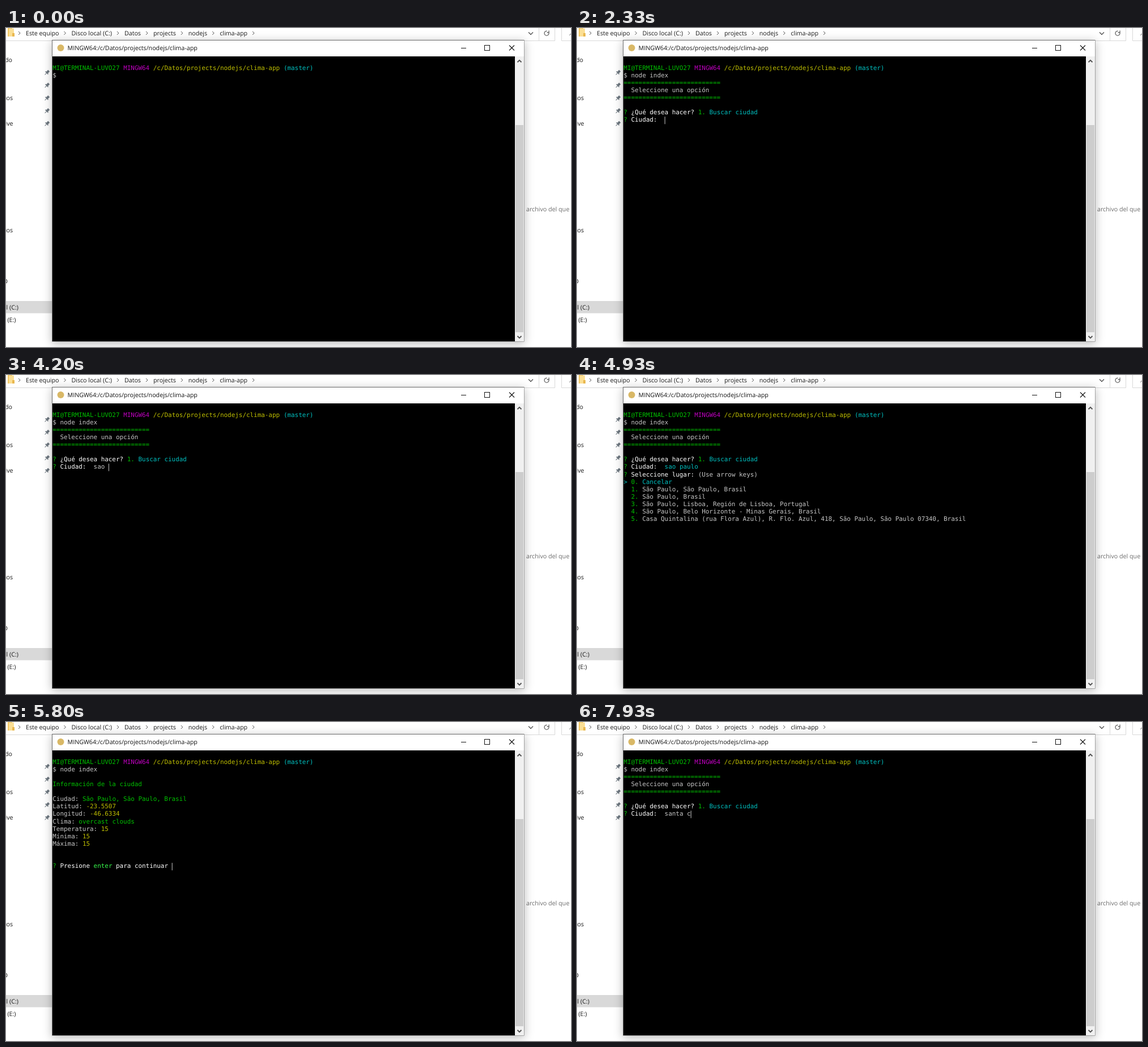
An HTML page with a canvas for the animation above (8000 ms loop, 997 by 562 pixels).

```html
<!DOCTYPE html>
<html lang="es">
<head>
<meta charset="utf-8">
<title>clima-app</title>
<style>
html, body { margin: 0; width: 100%; height: 100%; overflow: hidden; background: #fff; }
canvas { display: block; }
</style>
</head>
<body>
<canvas id="stage" width="997" height="562"></canvas>
<script>
const ctx = document.getElementById('stage').getContext('2d');
const LOOP = 8000;
const UI = '10.7px "Open Sans", "Noto Sans", sans-serif';
const MONO = '10.92px "DejaVu Sans Mono", monospace';
const X0 = 82.3, Y0 = 64.2, CW = 6.574, RH = 13.14;
const COLORS = {
  g: '#00bf00', G: '#38f84c', m: '#bf00bf', y: '#bfbf00',
  c: '#00bfbf', n: '#c6c6c6', w: '#ffffff'
};
ctx.textRendering = 'geometricPrecision';

function rect(x, y, w, h, color) {
  ctx.fillStyle = color;
  ctx.fillRect(x, y, w, h);
}

function stroke(color, width, ...points) {
  ctx.strokeStyle = color;
  ctx.lineWidth = width;
  ctx.beginPath();
  points.forEach(([x, y], i) => i ? ctx.lineTo(x, y) : ctx.moveTo(x, y));
  ctx.stroke();
}

// A "v" shape; dir is 1 for down and -1 for up.
function chevron(x, y, r, dir, color, width) {
  const h = dir * r / 2;
  stroke(color, width, [x - r, y - h], [x, y + h], [x + r, y - h]);
}

function label(text, x, y, color = '#1b1b1b', align = 'left') {
  ctx.font = UI;
  ctx.textAlign = align;
  ctx.fillStyle = color;
  ctx.fillText(text, x, y);
  return ctx.measureText(text).width;
}

function pin(x, y) {
  ctx.save();
  ctx.translate(x, y);
  ctx.rotate(Math.PI / 4);
  rect(-2, -4.5, 4, 5, '#6e7880');
  rect(-3.5, 0, 7, 1.5, '#6e7880');
  rect(-0.5, 1, 1, 4.5, '#6e7880');
  ctx.restore();
}

function drawAddressBar() {
  rect(3, 0, 8, 15, '#f3c766');
  rect(5, 1, 9, 14, '#fbdf94');
  rect(11, 9, 4, 6, '#e9b850');

  let x = 13;
  for (const name of ['', 'Este equipo', 'Disco local (C:)', 'Datos', 'projects', 'nodejs', 'clima-app']) {
    x += label(name, x, 12.8);
    stroke('#555', 1, [x + 9, 6], [x + 12, 9], [x + 9, 12]);
    x += 22;
  }

  const line = '#d9d9d9';
  stroke(line, 1, [0, 22.5], [968.5, 22.5], [968.5, 0]);
  stroke(line, 1, [940.5, 0], [940.5, 22]);
  stroke(line, 1, [980.5, 0], [980.5, 22.5], [997, 22.5]);
  chevron(926, 9.5, 4, 1, '#555', 1.4);
  ctx.strokeStyle = '#666';
  ctx.lineWidth = 1.3;
  ctx.beginPath();
  ctx.arc(954, 9.3, 4, -0.4, 4.9);
  ctx.stroke();
  stroke('#666', 1.3, [958, 4.5], [958, 8], [954.5, 8]);
  stroke('#777', 1, [994, 13], [997, 10]);
}

function drawExplorer() {
  rect(0, 0, 997, 562, '#fff');
  drawAddressBar();
  rect(0, 481, 82, 21.5, '#d9d9d9');
  const side = (text, right, y) => label(text, right, y, '#1b1b1b', 'right');
  side('do', 11, 59.5);
  side('tos', 12, 127);
  side('ive', 12.5, 172);
  side('tos', 12, 360);
  side('D', 3, 450);
  side('l (C:)', 22, 495.5);
  side('(E:)', 17.5, 518);
  for (let i = 0; i < 5; i++) pin(72.5, 78.4 + i * 22.5);
  label('archivo del que', 918, 322.5, '#6d6d6d');
}

function drawWindow() {
  ctx.save();
  ctx.shadowColor = 'rgba(0,0,0,0.27)';
  ctx.shadowBlur = 16;
  ctx.shadowOffsetY = 3;
  rect(81, 21, 833.5, 531.5, '#6a6a6a');
  ctx.restore();
  rect(82, 22, 832, 28, '#fff');
  rect(82, 50, 816, 502, '#000');

  ctx.fillStyle = '#d9b866';
  ctx.beginPath();
  ctx.arc(96.5, 35, 6, 0, 7);
  ctx.fill();
  label('MINGW64:/c/Datos/projects/nodejs/clima-app', 108.5, 39.3, '#111');

  rect(803, 35, 9, 1, '#111');
  ctx.strokeStyle = '#111';
  ctx.lineWidth = 1;
  ctx.strokeRect(844.5, 30.5, 9, 9);
  stroke('#111', 1.1, [888, 30.5], [897, 39.5]);
  stroke('#111', 1.1, [897, 30.5], [888, 39.5]);

  rect(898, 50, 16, 502, '#f0f0f0');
  rect(899, 171, 14, 365, '#cdcdcd');
  chevron(906, 58.5, 3.5, -1, '#505050', 1.8);
  chevron(906, 544.5, 3.5, 1, '#505050', 1.8);
}

// Prints a row from alternating colour keys and strings.
function row(r, ...parts) {
  ctx.font = MONO;
  ctx.textAlign = 'left';
  let col = 0;
  for (let i = 0; i < parts.length; i += 2) {
    ctx.fillStyle = COLORS[parts[i]];
    ctx.fillText(parts[i + 1], X0 + col * CW, Y0 + r * RH + 9.3);
    col += parts[i + 1].length;
  }
}

function options(top, items, picked, first = 0) {
  items.forEach((text, i) => {
    const on = i === picked;
    const num = (i + first) % items.length;
    row(top + i, 'c', on ? '> ' : '  ', 'g', num + '. ', on ? 'c' : 'n', text);
  });
}

const MENU = ['Buscar ciudad', 'Historial', 'Salir'];
const PLACES = [
  'Cancelar',
  'São Paulo, São Paulo, Brasil',
  'São Paulo, Brasil',
  'São Paulo, Lisboa, Región de Lisboa, Portugal',
  'São Paulo, Belo Horizonte - Minas Gerais, Brasil',
  'Casa Quintalina (rua Flora Azul), R. Flo. Azul, 418, São Paulo, São Paulo 07340, Brasil'
];

// Bursts of typing: start, time per key, keys ("<" deletes).
const COMMAND = [[70, 80, 'node'], [670, 92, ' index']];
const CITY = [[2670, 65, 'saopaulo'], [3800, 67, '<<<<<'], [4200, 80, ' paulo']];
const NEXT_CITY = [[7200, 130, 'sa'], [7670, 65, 'nta c']];

// Returns the text typed so far and the time of the latest key.
function typing(bursts, t, since) {
  let text = '', last = since;
  for (const [start, step, keys] of bursts)
    [...keys].forEach((key, i) => {
      const at = start + i * step;
      if (t < at) return;
      text = key === '<' ? text.slice(0, -1) : text + key;
      last = at;
    });
  return { text, last };
}

// The blink restarts with each key press or new prompt.
function cursor(r, col, age) {
  const HALF = 165, LEAD = 25;
  if (Math.floor((age + LEAD) / HALF) % 2 === 0)
    rect(X0 + col * CW, Y0 + r * RH, 1, RH, '#c8c8c8');
}

function banner() {
  row(2, 'g', '='.repeat(26));
  row(3, 'n', '  Seleccione una opción');
  row(4, 'g', '='.repeat(26));
}

function menu() {
  banner();
  row(6, 'g', '? ', 'w', '¿Qué desea hacer? ', 'n', '(Use arrow keys)');
  options(7, MENU, 0, 1);
}

function cityPrompt(text, color = 'n') {
  banner();
  row(6, 'g', '? ', 'w', '¿Qué desea hacer? ', 'g', '1. ', 'c', MENU[0]);
  row(7, 'g', '? ', 'w', 'Ciudad:  ', color, text);
}

function askCity(bursts, t, start) {
  const { text, last } = typing(bursts, t, start);
  cityPrompt(text);
  cursor(7, 11 + text.length, t - last);
}

function placePrompt(...answer) {
  cityPrompt('sao paulo', 'c');
  row(8, 'g', '? ', 'w', 'Seleccione lugar: ', ...answer);
}

function placeList(picked) {
  placePrompt('n', '(Use arrow keys)');
  options(9, PLACES, picked);
}

function report(t, start) {
  row(3, 'g', 'Información de la ciudad');
  [['Ciudad', 'g', PLACES[1]], ['Latitud', 'y', '-23.5507'],
   ['Longitud', 'y', '-46.6334'], ['Clima', 'g', 'overcast clouds'],
   ['Temperatura', 'y', '15'], ['Mínima', 'y', '15'], ['Máxima', 'y', '15']
  ].forEach(([name, color, value], i) => row(5 + i, 'n', name + ': ', color, value));
  row(14, 'g', '? ', 'w', 'Presione ', 'G', 'enter', 'w', ' para continuar');
  cursor(14, 32, t - start);
}

const SCENES = [
  [-200, (t, start) => {
    const { text, last } = typing(COMMAND, t, start);
    cursor(1, 2 + text.length, t - last);
  }],
  [1330, (t, start) => cursor(2, 0, t - start)],
  [1470, menu],
  [2330, (t, start) => askCity(CITY, t, start)],
  [4670, (t, start) => { cityPrompt('sao paulo', 'c'); cursor(8, 0, t - start); }],
  [4870, () => placeList(0)],
  [5400, () => placeList(1)],
  [5600, (t, start) => { placePrompt('g', '1. ', 'c', PLACES[1]); cursor(9, 0, t - start); }],
  [5730, report],
  [6730, menu],
  [7130, (t, start) => askCity(NEXT_CITY, t, start)]
];

function draw(t) {
  drawExplorer();
  drawWindow();
  row(0, 'g', 'MI@TERMINAL-LUVO27 ', 'm', 'MINGW64 ',
    'y', '/c/Datos/projects/nodejs/clima-app ', 'c', '(master)');
  row(1, 'n', '$ ' + typing(COMMAND, t, 0).text);
  const [start, scene] = SCENES.filter(([at]) => t >= at).pop();
  scene(t, start);
}

const origin = performance.now();
function tick() {
  draw((performance.now() - origin) % LOOP);
  requestAnimationFrame(tick);
}
tick();
</script>
</body>
</html>
```
